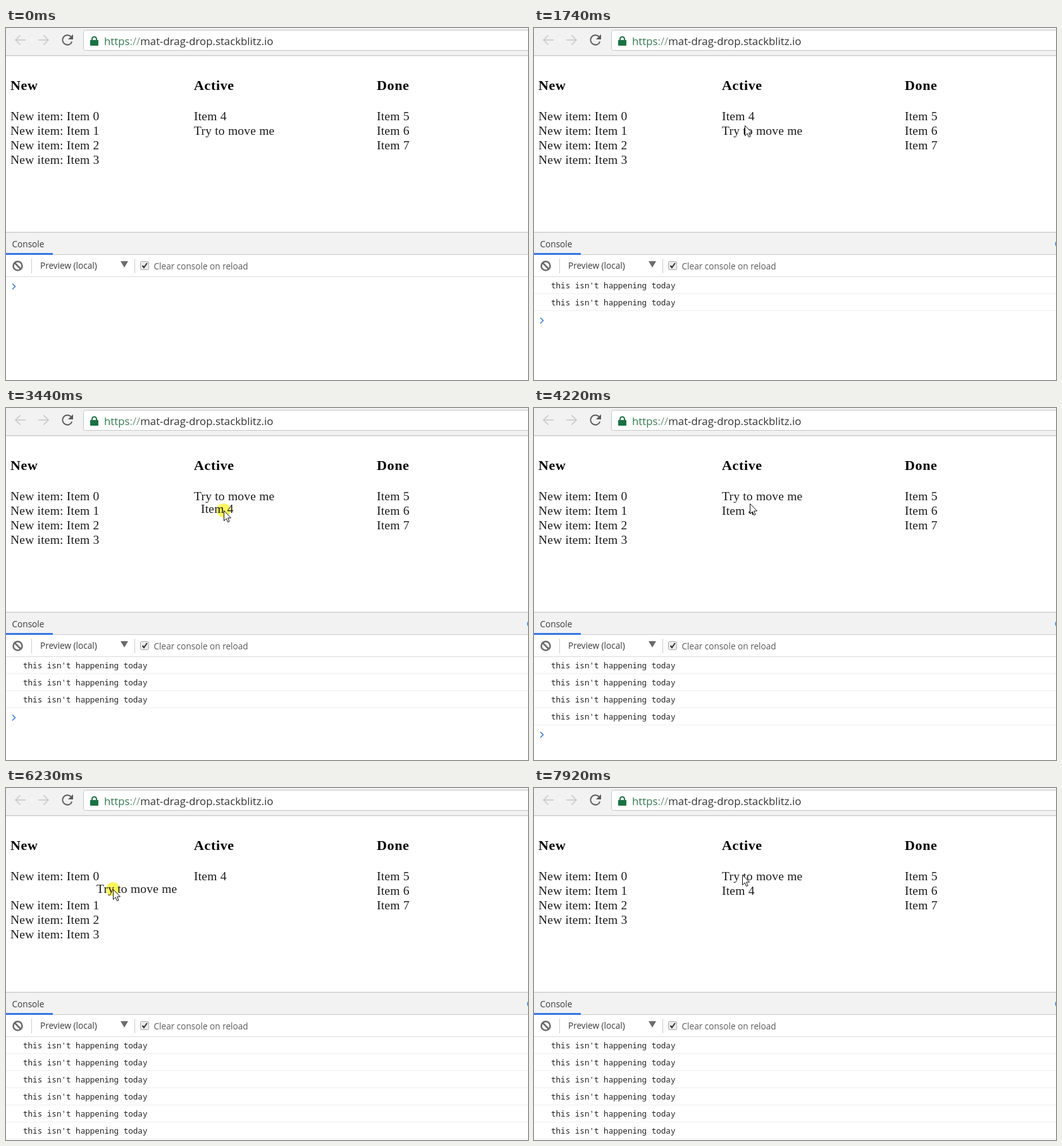
Write an HTML page that moves like this. It is 825 px wide and 557 px high and loops after 7.99 s.

```html
<!DOCTYPE html>
<html lang="en">
<head>
<meta charset="utf-8">
<title>Drag and drop lists</title>
<style>
  html, body { margin: 0; width: 100%; height: 100%; overflow: hidden; background: #fff; }
  svg { display: block; width: 825px; height: 557px; }
  .list { font: 19.5px "Liberation Serif", Times, serif; letter-spacing: .22px; fill: #1c1c1c; }
  .list .head { font-size: 22px; font-weight: bold; letter-spacing: .65px; fill: #000; }
  .ui { font: 13.6px "Open Sans", "Noto Sans", sans-serif; fill: #3a3a3a; }
  .url { font-size: 16.8px; fill: #333; }
  .log { font: 12.6px "Noto Sans Mono", monospace; fill: #222; }
  .line { fill: none; stroke-width: 2; }
</style>
</head>
<body>
<svg viewBox="0 0 825 557">
  <!-- browser bar -->
  <rect width="825" height="43" fill="#f2f2f2"/>
  <path d="M0 43.5H825" stroke="#c8c8c8"/>
  <path d="M0 44.5H825" stroke="#eaeaea"/>
  <rect x="122.5" y="3.5" width="720" height="32" rx="3" fill="#fff" stroke="#c6c6c6"/>
  <g class="line" stroke="#d0d0d0">
    <path d="M31 19H15M22.5 11.5L15 19L22.5 26.5"/>
    <path d="M51 19H67M59.5 11.5L67 19L59.5 26.5"/>
  </g>
  <path class="line" stroke="#5a5a5a" d="M102.5 13.5A7.7 7.7 0 1 0 104.300 21.5"/>
  <path d="M106 10V18H98Z" fill="#5a5a5a"/>
  <rect x="133" y="19" width="13" height="9" rx="1" fill="#1a7343"/>
  <path class="line" stroke="#1a7343" d="M136 20V17.5A3.5 3.5 0 0 1 143 17.5V20"/>
  <text class="ui url" x="155" y="27"><tspan fill="#2f7a50">https</tspan><tspan fill="#7c9a88">://</tspan>mat-drag-drop.stackblitz.io</text>

  <g id="lists" class="list"></g>

  <!-- console -->
  <rect y="323" width="825" height="36" fill="#f2f2f2"/>
  <path d="M0 322.5H825" stroke="#ececec"/>
  <path d="M0 323.5H825M0 358.5H825" stroke="#cacaca"/>
  <path d="M0 393.5H825" stroke="#dadada"/>
  <path d="M40.5 365V388M203.5 365V388" stroke="#ccc"/>
  <rect y="356" width="74" height="3" fill="#3577e5"/>
  <g class="ui">
    <text x="9.5" y="347">Console</text>
    <text x="54" y="381">Preview (local)</text>
    <text x="233.5" y="382" fill="#5a5a5a">Clear console on reload</text>
  </g>
  <g class="line" stroke="#6b6b6b" style="stroke-width:2.6">
    <circle cx="18.5" cy="376.5" r="7"/>
    <path d="M13.5 371.5L23.5 381.5"/>
  </g>
  <path d="M181 369H193L187 379Z" fill="#6b6b6b"/>
  <rect x="212.5" y="369.5" width="13" height="13" rx="2" fill="#ededed" stroke="#a8a8a8"/>
  <path class="line" stroke="#333" d="M215.5 376L218 379L223 372"/>
  <circle id="badge" cx="829.5" cy="341.5" r="6" fill="#4285f4"/>
  <g id="logs"></g>
  <path id="prompt" class="line" stroke="#367cf1" style="stroke-width:1.6" d="M10 -4.5L14.5 0L10 4.5"/>

  <g id="pointer">
    <circle id="halo" r="11" fill="#fdf65a" style="mix-blend-mode:multiply"/>
    <path d="M.5 .5V16.5L4.2 13L6.5 18.5L9 17.5L6.7 12H11.5Z" fill="#fff" stroke="#111"/>
  </g>
</svg>
<script>
const LOOP = 7990, ROW = 23, LOG_ROW = 27;
const columnX = [7, 297, 586];
const $ = id => document.getElementById(id);

function add(parent, tag, attrs, text = "") {
  const el = document.createElementNS("http://www.w3.org/2000/svg", tag);
  for (const name in attrs) el.setAttribute(name, attrs[name]);
  el.textContent = text;
  return parent.appendChild(el);
}

// A drag swings from grab to drop, bulging by pull on the way.
const drag = (start, end, item, grab, pull = [0, 0], drop = grab) =>
  ({ start, end, item, grab, pull, drop });
const nudgeUp = (start, end) => drag(start, end, "T", [333, 154], [-8, -24]);

const entry = { end: 120, drop: [525, 376] };
const drags = [
  nudgeUp(500, 970),
  nudgeUp(1350, 1640),
  nudgeUp(1890, 2180),
  drag(2800, 3800, "4", [333, 142], [6, 14], [341, 153]),
  drag(4300, 4700, "T", [341, 151], [2, -4]),
  drag(4910, 5080, "T", [340, 146], [0, 0], [338, 148]),
  drag(5690, 7320, "T", [323, 140], [-181, 24], [329, 137])
];
const LOGGED = 6;

["New", "Active", "Done"].forEach((name, i) =>
  add($("lists"), "text", { class: "head", x: columnX[i], y: 98 }, name));
for (let i = 0; i < 3; i++)
  add($("lists"), "text", { x: columnX[2], y: 146 + ROW * i }, "Item " + (5 + i));

const items = {};
for (const key of "01234T") {
  const label = key === "T" ? "Try to move me" : (key < 4 ? "New item: " : "") + "Item " + key;
  items[key] = add($("lists"), "text", {}, label);
}

const logs = drags.slice(0, LOGGED).map((_, i) => {
  const row = add($("logs"), "g", { transform: `translate(0 ${LOG_ROW * i})` });
  add(row, "text", { class: "log", x: 27, y: 412 }, "this isn't happening today");
  add(row, "path", { d: "M0 420.5H825", stroke: "#efefef" });
  return row;
});

const show = (el, on) => el.setAttribute("visibility", on ? "inherit" : "hidden");
const move = (el, x, y) => el.setAttribute("transform", `translate(${Math.round(x)} ${Math.round(y)})`);
const mix = (a, b, k) => a.map((v, i) => v + (b[i] - v) * k);

function dragPoint({ start, end, grab, pull, drop }, t) {
  const u = Math.min(1, (t - start) / (end - start));
  return mix(grab, drop, u).map((v, i) => v + pull[i] * Math.sin(Math.PI * u));
}

function pointerAt(t) {
  const active = drags.find(d => t >= d.start && t <= d.end);
  if (active) return dragPoint(active, t);
  const last = [entry, ...drags].filter(d => d.end <= t).pop() || entry;
  const next = drags.find(d => d.start > t);
  if (!next) return last.drop;
  const glide = Math.min(300, next.start - last.end);
  const u = Math.min(1, Math.max(0, (t - last.end) / glide));
  return mix(last.drop, next.grab, u * u * (3 - 2 * u));
}

// Replays all drags up to t; the pointer decides each item's column and row.
function columnsAt(t) {
  const columns = [[..."0123"], [..."4T"]];
  for (const d of drags) {
    if (d.start > t) break;
    const [x, y] = dragPoint(d, t);
    for (const c of columns)
      if (c.includes(d.item)) c.splice(c.indexOf(d.item), 1);
    columns[x < 260 ? 0 : 1].splice(y > 152 ? 1 : 0, 0, d.item);
  }
  return columns;
}

function homesAt(t) {
  const homes = {};
  columnsAt(t).forEach((keys, c) =>
    keys.forEach((key, row) => homes[key] = [columnX[c], 146 + ROW * row]));
  return homes;
}

function draw(t) {
  const [px, py] = pointerAt(t);
  const places = homesAt(t);
  const active = drags.find(d => t >= d.start && t < d.end);
  if (active) {
    const [x, y] = homesAt(active.start)[active.item];
    places[active.item] = [x + px - active.grab[0], y + py - active.grab[1]];
  }
  for (const key in items) move(items[key], ...places[key]);

  const count = Math.min(LOGGED, drags.filter(d => d.end <= t).length);
  logs.forEach((row, i) => show(row, i < count));
  show($("badge"), count > 0);
  move($("prompt"), 0, 409 + LOG_ROW * count);

  show($("pointer"), t >= entry.end);
  show($("halo"), active);
  move($("pointer"), px, py);
}

function tick() {
  draw(performance.now() % LOOP);
  requestAnimationFrame(tick);
}
tick();
</script>
</body>
</html>
```
